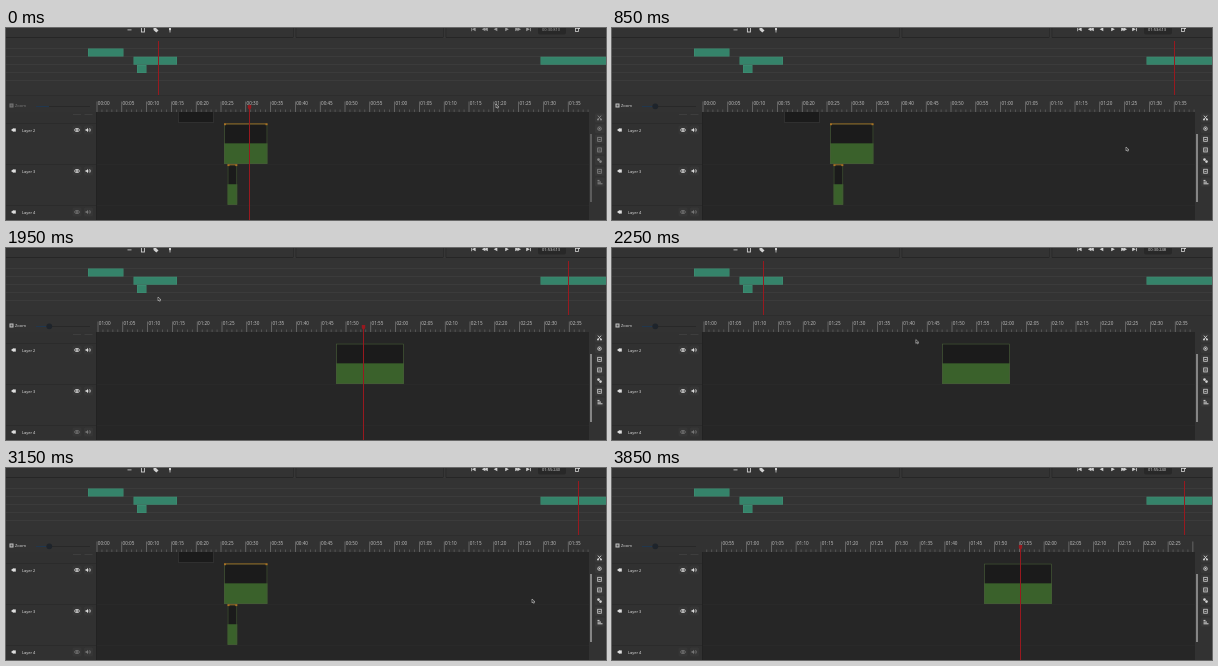
These frames come from a looping animation (600x192 px, 4.45 s). An HTML page with a canvas:

```html
<!DOCTYPE html>
<html lang="en">
<head>
<meta charset="utf-8">
<title>Timeline seeking</title>
<style>
html, body { margin: 0; width: 100%; height: 100%; overflow: hidden; background: #333; }
canvas { display: block; width: 600px; height: 192px; }
</style>
</head>
<body>
<canvas id="stage"></canvas>
<script>
const LOOP = 4450, TICK = 50;
const PX_PER_SEC = 4.96;
const canvas = document.getElementById('stage');
const ctx = canvas.getContext('2d');
const ratio = window.devicePixelRatio || 1;
canvas.width = 600 * ratio;
canvas.height = 192 * ratio;
ctx.scale(ratio, ratio);

// Each state holds from its start time: playhead seconds and overview x.
const seeks = [
  { at: 0, sec: 30.81, code: '00:30:810', x: 152 },
  { at: 600, sec: 113.45, code: '01:53:613', x: 562 },
  { at: 2050, sec: 30.45, code: '00:30:248', x: 151 },
  { at: 2950, sec: 115.24, code: '01:55:240', x: 572 }
];
// Ruler position of 01:00.
const scrolls = [
  { at: 0, minute: 388.6 },
  { at: 900, minute: 92 },
  { at: 2350, minute: 388.6 },
  { at: 3200, minute: 134.5 }
];
// Pointer stops: time, x, y.
const pointer = [
  [0, 490, 76], [50, 490, 76], [300, 562, 48], [350, 562, 48], [550, 514, 119],
  [1200, 514, 119], [1250, 512, 120], [1750, 158, 43], [1900, 152, 49], [2000, 152, 49],
  [2300, 316, 95], [2650, 316, 95], [2850, 572, 48], [2900, 572, 48], [3150, 526, 131],
  [3500, 526, 131], [3850, 203, 21]
];

const current = (list, t) => list.filter(s => s.at <= t).pop();

function rect(x, y, w, h, color) {
  ctx.fillStyle = color;
  ctx.fillRect(x, y, w, h);
}

function text(str, x, y, size, color) {
  ctx.font = size + 'px "Noto Sans", sans-serif';
  ctx.fillStyle = color;
  ctx.fillText(str, x, y);
}

function shape(points, color) {
  ctx.fillStyle = color;
  ctx.beginPath();
  points.forEach(([x, y]) => ctx.lineTo(x, y));
  ctx.fill();
}

function roundBox(x, y, w, h, r, color) {
  ctx.fillStyle = color;
  ctx.beginPath();
  ctx.roundRect(x, y, w, h, r);
  ctx.fill();
}

function frame(x, y, w, h, color, width = 0.8) {
  ctx.strokeStyle = color;
  ctx.lineWidth = width;
  ctx.strokeRect(x, y, w, h);
}

function ring(x, y, rx, ry, color) {
  ctx.strokeStyle = color;
  ctx.lineWidth = 0.8;
  ctx.beginPath();
  ctx.ellipse(x, y, rx, ry, 0, 0, Math.PI * 2);
  ctx.stroke();
}

function dot(x, y, r, color) {
  ctx.fillStyle = color;
  ctx.beginPath();
  ctx.arc(x, y, r, 0, Math.PI * 2);
  ctx.fill();
}

function arrow(x, y, dir, color) {
  shape([[x - 1.8 * dir, y - 2], [x + 1.8 * dir, y], [x - 1.8 * dir, y + 2]], color);
}

function drawTransport(ink) {
  const y = 1.2;
  rect(465.3, 0, 0.8, 3.2, ink);
  arrow(467.8, y, -1, ink);
  arrow(477.6, y, -1, ink);
  arrow(480, y, -1, ink);
  arrow(489.5, y, -1, ink);
  arrow(501, y, 1, ink);
  arrow(511, y, 1, ink);
  arrow(513.2, y, 1, ink);
  arrow(522, y, 1, ink);
  rect(524, 0, 0.8, 3.2, ink);
}

function drawTopBar(code, dim) {
  const ink = '#d2d2d2';
  rect(0, 0, 600, 13, '#333');
  rect(0, 9, 600, 1, '#262626');
  [288, 438].forEach(x => {
    rect(x - 1, 0, 3, 10, '#363636');
    rect(x - 1, 0, 0.6, 9.5, '#262626');
    rect(x + 1.6, 0, 0.6, 9.5, '#262626');
  });
  rect(121.5, 1.5, 4, 0.8, ink);
  frame(135.4, -1, 3, 5, ink, 0.9);
  shape([[147.5, 0], [150, 0], [152.5, 2.5], [150.3, 4.5], [147.5, 2]], ink);
  rect(163, 0, 2, 2.2, ink);
  rect(163.6, 2, 0.8, 2.5, ink);
  drawTransport(dim ? '#999' : ink);
  roundBox(532, -4, 28, 10.5, 2, '#282828');
  text(code, 536, 2.6, 4, dim ? '#999' : '#d0d0d0');
  frame(569.5, 0.5, 3, 3, ink);
  rect(572, -1, 2, 2, ink);
}

function drawOverview(seek, t) {
  rect(0, 13, 600, 54, '#333');
  for (let y = 20; y <= 52; y += 8) rect(0, y, 600, 1, '#3b3b3b');
  [[82, 20.5, 35.5], [127.5, 28.7, 43.5], [131, 37, 9.5], [534.5, 28.7, 66]].forEach(([x, y, w]) => {
    rect(x, y, w, 8, '#3f8f74');
    rect(x + 0.6, y + 0.6, w - 1.2, 6.8, '#35836a');
  });
  const faded = t >= 2350 && t < 2950;
  rect(seek.x, 13, 1, 54, faded ? '#4a3838' : '#98191f');
  rect(0, 67, 600, 1, '#2d2d2d');
}

function drawRuler(minute) {
  rect(0, 68, 600, 16, '#323232');
  ctx.save();
  ctx.beginPath();
  ctx.rect(90, 68, 493, 17);
  ctx.clip();
  const pad = n => String(n).padStart(2, '0');
  for (let s = 0; s < 170; s++) {
    const x = minute + (s - 60) * PX_PER_SEC;
    if (x < 90 || x > 583) continue;
    const major = s % 5 === 0;
    rect(x - 0.3, major ? 73.5 : 81.5, 0.6, major ? 10.5 : 2.5, major ? '#858585' : '#686868');
    if (major && x < 575) {
      text(pad(Math.floor(s / 60)) + ':' + pad(s % 60), x + 0.8, 77.2, 4.6, '#bdbdbd');
    }
  }
  ctx.restore();
}

function drawZoom(dim) {
  rect(3.5, 75.5, 4, 4, dim ? '#777' : '#c4c4c4');
  rect(4.5, 76.5, 2, 2, '#555');
  text('Zoom', 9, 79.2, 4.1, dim ? '#777' : '#d0d0d0');
  rect(30, 78, 54, 1, '#282828');
  rect(30, 78, 13, 1, '#20374f');
  if (!dim) dot(43.3, 78.3, 2.9, '#1e242b');
}

function drawEye(x, y, color) {
  ring(x, y, 2.4, 1.6, color);
  dot(x, y, 0.9, color);
}

function drawSpeaker(x, y, color) {
  shape([[x - 2.5, y - 0.8], [x - 1.3, y - 0.8], [x, y - 2.2], [x, y + 2.2], [x - 1.3, y + 0.8], [x - 2.5, y + 0.8]], color);
  ctx.strokeStyle = color;
  ctx.lineWidth = 0.7;
  [1.2, 2.4].forEach(r => {
    ctx.beginPath();
    ctx.arc(x, y, r, -0.9, 0.9);
    ctx.stroke();
  });
}

function drawLayers() {
  const ink = '#dedede';
  rect(0, 84, 90, 108, '#313131');
  rect(90, 84, 493, 108, '#262626');
  [71, 82.5].forEach(x => rect(x - 4, 86, 8, 1, '#3e3e3e'));
  rect(0, 95, 90, 1, '#2b2b2b');
  [2, 3, 4].forEach((n, i) => {
    const y = 102 + i * 41;
    const iconInk = n === 4 ? '#777' : ink;
    if (i) {
      rect(0, y - 7, 90, 1, '#2b2b2b');
      rect(90, y - 7, 493, 1, '#292929');
    }
    rect(7, y - 1.6, 2.8, 3.2, ink);
    shape([[5, y], [7.3, y - 1.8], [7.3, y + 1.8]], ink);
    text('Layer ' + n, 16, y + 1.5, 3.9, ink);
    [71, 82.5].forEach(x => roundBox(x - 4.5, y - 4.5, 9, 9, 1.5, '#363636'));
    drawEye(71, y, iconInk);
    drawSpeaker(82, y, iconInk);
  });
  rect(90, 84, 1, 108, '#222');
}

function drawClip(x, y, w, h, accent) {
  rect(x, y, w, h, '#1b1b1b');
  rect(x, y + h * 0.49, w, h * 0.51, '#3a612b');
  frame(x + 0.5, y + 0.5, w - 1, h - 1, '#465a38', 0.7);
  if (!accent) return;
  rect(x, y, w, 0.8, accent);
  rect(x, y, 2, 1.7, accent);
  rect(x + w - 2, y, 2, 1.7, accent);
}

function drawClips(minute, t) {
  if (minute < 300) {
    drawClip(Math.round(minute + 237.5), 95.5, 68, 40.5);
    return;
  }
  const hovered = t >= 2350 && t < 2900;
  rect(172, 84, 36, 10.5, '#3a3a3a');
  rect(172.7, 84, 34.6, 10, '#1b1b1b');
  drawClip(218, 95.5, 43.5, 40.5, hovered ? '#857632' : '#a87024');
  drawClip(221.5, 136.4, 9.8, 40.5, '#a87024');
  if (hovered) [218, 260.3].forEach(x => rect(x, 96, 1.2, 40, '#a9b3a4'));
}

function drawPlayhead(x) {
  const left = Math.floor(x);
  const color = '#98191f';
  rect(left, 78, 1, 114, color);
  shape([[left - 1.2, 77], [left + 2.2, 77], [left + 2.2, 80], [left + 0.5, 82], [left - 1.2, 80]], color);
}

function drawScissors(x, y, color) {
  ctx.strokeStyle = color;
  ctx.lineWidth = 0.9;
  ctx.beginPath();
  ctx.moveTo(x - 1.6, y - 2.4);
  ctx.lineTo(x + 1.2, y + 1);
  ctx.moveTo(x + 1.6, y - 2.4);
  ctx.lineTo(x - 1.2, y + 1);
  ctx.stroke();
  dot(x - 1.5, y + 1.5, 1, color);
  dot(x + 1.5, y + 1.5, 1, color);
}

function drawTools(dim) {
  const ink = dim ? '#888' : '#d2d2d2';
  const x = 593.5;
  const box = y => {
    frame(x - 1.8, y - 2, 3.6, 4, ink);
    rect(x - 1, y - 0.3, 2, 0.8, ink);
  };
  const knob = y => {
    ring(x, y, 1.8, 1.8, ink);
    dot(x, y, 0.8, ink);
  };
  const link = y => {
    dot(x - 1, y - 1, 1.3, ink);
    dot(x + 1, y + 1, 1.3, ink);
  };
  const bars = y => [2, 3.5, 5].forEach((w, k) => rect(x - 2, y - 2 + k * 1.7, w, 1, ink));
  const scissors = y => drawScissors(x, y, ink);
  rect(583, 84, 17, 108, '#323232');
  rect(584, 106, 2, 68, dim ? '#5c5c5c' : '#858585');
  [scissors, knob, box, box, link, box, bars].forEach((icon, i) => {
    const y = 90 + i * 10.65;
    roundBox(589, y - 4.5, 9.5, 9, 1, '#383838');
    icon(y);
  });
}

function drawPointer(t) {
  if (t >= 3850) return;
  const i = pointer.findIndex(p => p[0] > t);
  const [t0, x0, y0] = pointer[i - 1], [t1, x1, y1] = pointer[i];
  const k = (t - t0) / (t1 - t0), e = k * k * (3 - 2 * k);
  const x = x0 + (x1 - x0) * e, y = y0 + (y1 - y0) * e;
  const outline = [[0, 0], [0, 3.8], [0.9, 3], [1.6, 4.3], [2.4, 3.9], [1.7, 2.7], [2.9, 2.7]];
  shape(outline.map(([px, py]) => [x + px, y + py]), '#151515');
  ctx.closePath();
  ctx.strokeStyle = '#d0d0d0';
  ctx.lineWidth = 0.6;
  ctx.stroke();
}

function render(now) {
  const t = Math.floor((now % LOOP) / TICK) * TICK;
  const seek = current(seeks, t);
  const { minute } = current(scrolls, t);
  const playheadX = minute + (seek.sec - 60) * PX_PER_SEC;
  const dim = t < 600;
  drawTopBar(seek.code, dim);
  drawOverview(seek, t);
  drawRuler(minute);
  drawZoom(dim);
  drawLayers();
  drawClips(minute, t);
  // The timeline scrolls a little after a seek, so the playhead can be out of view.
  if (playheadX > 90 && playheadX < 583) drawPlayhead(playheadX);
  drawTools(dim);
  drawPointer(t);
}

const start = performance.now();
function loop() {
  render(performance.now() - start);
  requestAnimationFrame(loop);
}
loop();
</script>
</body>
</html>
```
